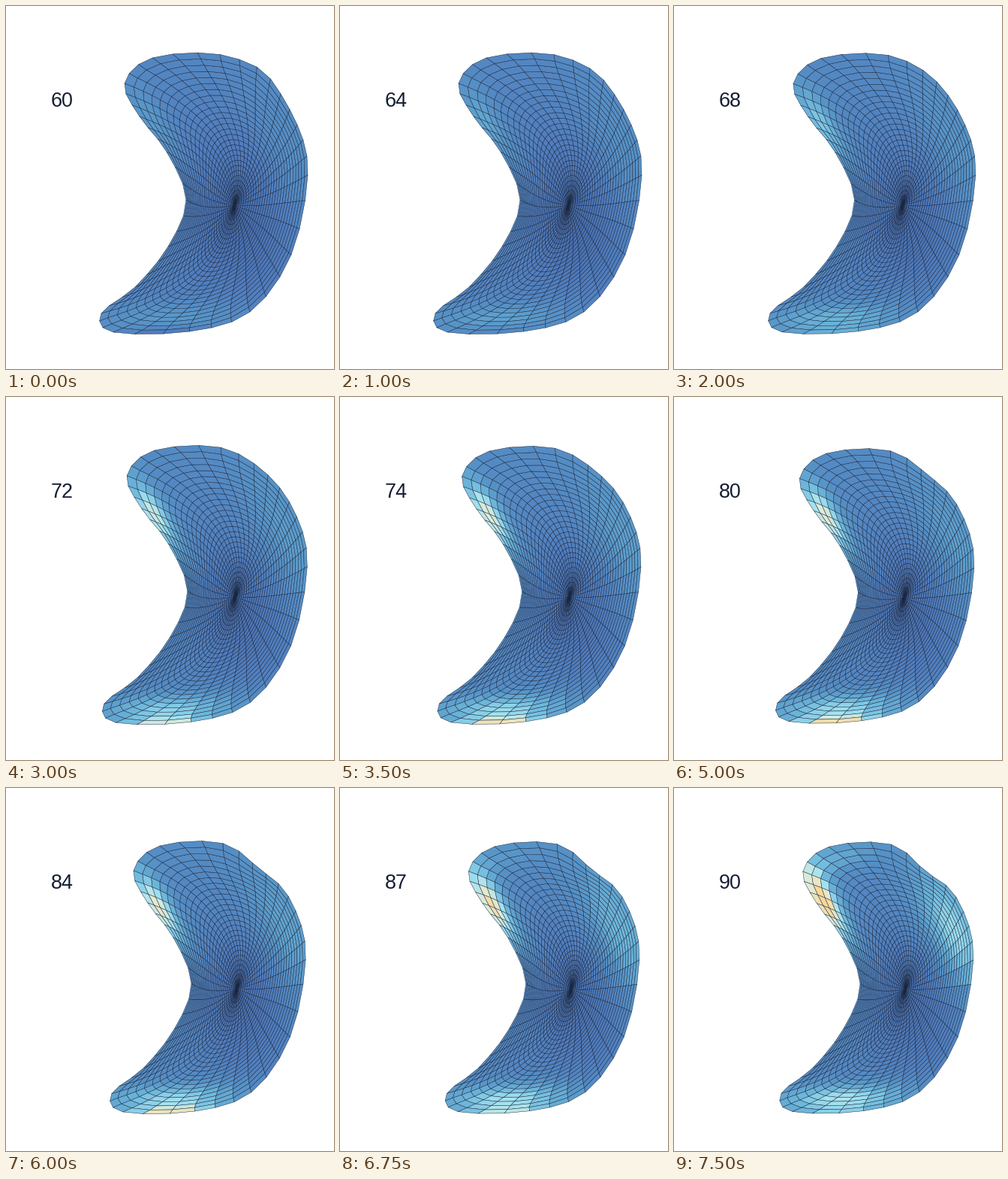
These frames come from a looping animation (437x483 px, 7.75 s). A matplotlib script:

```python
import numpy as np
import matplotlib.pyplot as plt
from matplotlib.animation import FuncAnimation
from matplotlib.collections import PolyCollection
from matplotlib.colors import LinearSegmentedColormap

W, H, DPI = 437, 483, 100
FRAMES, STEP = 31, 250
FIRST = 60
SPOKES, RINGS = 48, 28

POLE = np.array([304.5, 265])
CENTER = np.array([355, 335])
SHRINK = np.array([.07, .035])

# Outline knots, counterclockwise from the right at equal angles
KNOTS = np.array([
    (402, 225), (388, 158), (349, 102), (285, 65), (195, 69), (158, 103),
    (178, 147), (214, 194), (240, 258), (216, 320), (172, 374), (127, 409),
    (143, 434), (245, 433), (325, 407), (380, 331)])

# Bright and dark spots: x, y, long and short spread, tilt in degrees,
# then strength at the start, gain while warming up, gain near the end
SPOTS = [
    (195, 155, 45, 13, 58, .20, .35, 0),
    (178, 118, 30, 18, 65, 0, 0, .20),
    (205, 85, 40, 14, -15, 0, 0, .25),
    (372, 185, 65, 26, 65, .12, .08, .28),
    (215, 415, 65, 14, -3, .20, .22, .05),
    (210, 436, 45, 7, -3, -.20, .66, -.30),
    (320, 300, 70, 40, 70, -.14, 0, 0),
]

CMAP = LinearSegmentedColormap.from_list("sea", [
    (0, "#4264a5"), (.25, "#507dbe"), (.5, "#5896c8"), (.7, "#6eb9dc"),
    (.82, "#a0e1f0"), (.92, "#e1ebd7"), (1, "#fad796")])


def smooth(value, start, stop):
    x = np.clip((value - start) / (stop - start), 0, 1)
    return x * x * (3 - 2 * x)


def shrink(points, value):
    return points + SHRINK * smooth(value, 64, 90) * (CENTER - points)


def rim(angle, value):
    """Closed Catmull-Rom curve through the knots, with a fading bulge."""
    s = (angle / (2 * np.pi) * len(KNOTS)) % len(KNOTS)
    i = np.floor(s).astype(int)
    f = (s - i)[..., None]
    a, b, c, d = (KNOTS[(i + k) % len(KNOTS)] for k in (-1, 0, 1, 2))
    curve = b + f / 2 * (c - a + f * (2 * a - 5 * b + 4 * c - d
                                      + f * (3 * (b - c) + d - a)))
    bulge = np.exp(-((s - 2.2) / .5) ** 2)[..., None] * np.array([4, -6])
    return shrink(curve + bulge * (1 - (value - FIRST) / 12), value)


def bow(low, mid, high, s, power):
    """Curve through three points at s = -1, 0 and 1."""
    s = np.asarray(s)[..., None]
    return mid + s * (high - low) / 2 + np.abs(s) ** power * ((high + low) / 2 - mid)


def mesh(value):
    """Bend a polar disc: its upright axis follows a spine, its rows span the rim."""
    t = np.linspace(0, 1, RINGS + 1)[:, None]
    angle = 2 * np.pi * np.arange(SPOKES) / SPOKES
    u, v = t * np.cos(angle), np.clip(t * np.sin(angle), -1, 1)
    across = u / np.maximum(np.sqrt(1 - v * v), 1e-9)
    tilt = np.arcsin(v)
    top, bottom = rim(np.array([.5, 1.5]) * np.pi, value)
    spine = bow(bottom, shrink(POLE, value), top, v, 2.5)
    return bow(rim(np.pi - tilt, value), spine, rim(tilt, value), across, 2)


def cells(grid):
    turn = np.roll(grid, -1, axis=1)
    quads = np.stack([grid[:-1], grid[1:], turn[1:], turn[:-1]], axis=2)
    return quads.reshape(-1, 4, 2)


def shade(value, centers):
    warm, late = smooth(value, 60, 75), smooth(value, 82, 92)
    t = np.repeat((np.arange(RINGS) + .5) / RINGS, SPOKES)
    level = .22 + .12 * t + .05 * warm
    for x, y, long, short, tilt, base, gain, finish in SPOTS:
        a = np.radians(tilt)
        dx, dy = (centers - shrink(np.array([x, y]), value)).T
        p = (dx * np.cos(a) + dy * np.sin(a)) / long
        q = (dy * np.cos(a) - dx * np.sin(a)) / short
        strength = base + gain * warm + finish * late
        level += strength * np.exp(-(p * p + q * q) / 2)
    return CMAP(np.clip(level, 0, 1))


fig = plt.figure(figsize=(W / DPI, H / DPI), dpi=DPI, facecolor="white")
ax = fig.add_axes([0, 0, 1, 1])
ax.set_xlim(0, W)
ax.set_ylim(H, 0)
ax.axis("off")

surface = PolyCollection([], edgecolors="#16223a", linewidths=.33)
ax.add_collection(surface, autolim=False)
counter = ax.text(59.5, 134, "", family="Liberation Sans",
                  fontsize=27 * 72 / DPI, color="#141e32",
                  ha="left", va="baseline")


def draw(i):
    value = FIRST + i
    quads = cells(mesh(value))
    surface.set_verts(quads)
    surface.set_facecolor(shade(value, quads.mean(axis=1)))
    counter.set_text(str(value))
    return surface, counter


anim = FuncAnimation(fig, draw, frames=FRAMES, interval=STEP,
                     repeat=True, repeat_delay=0)
plt.show()
```
